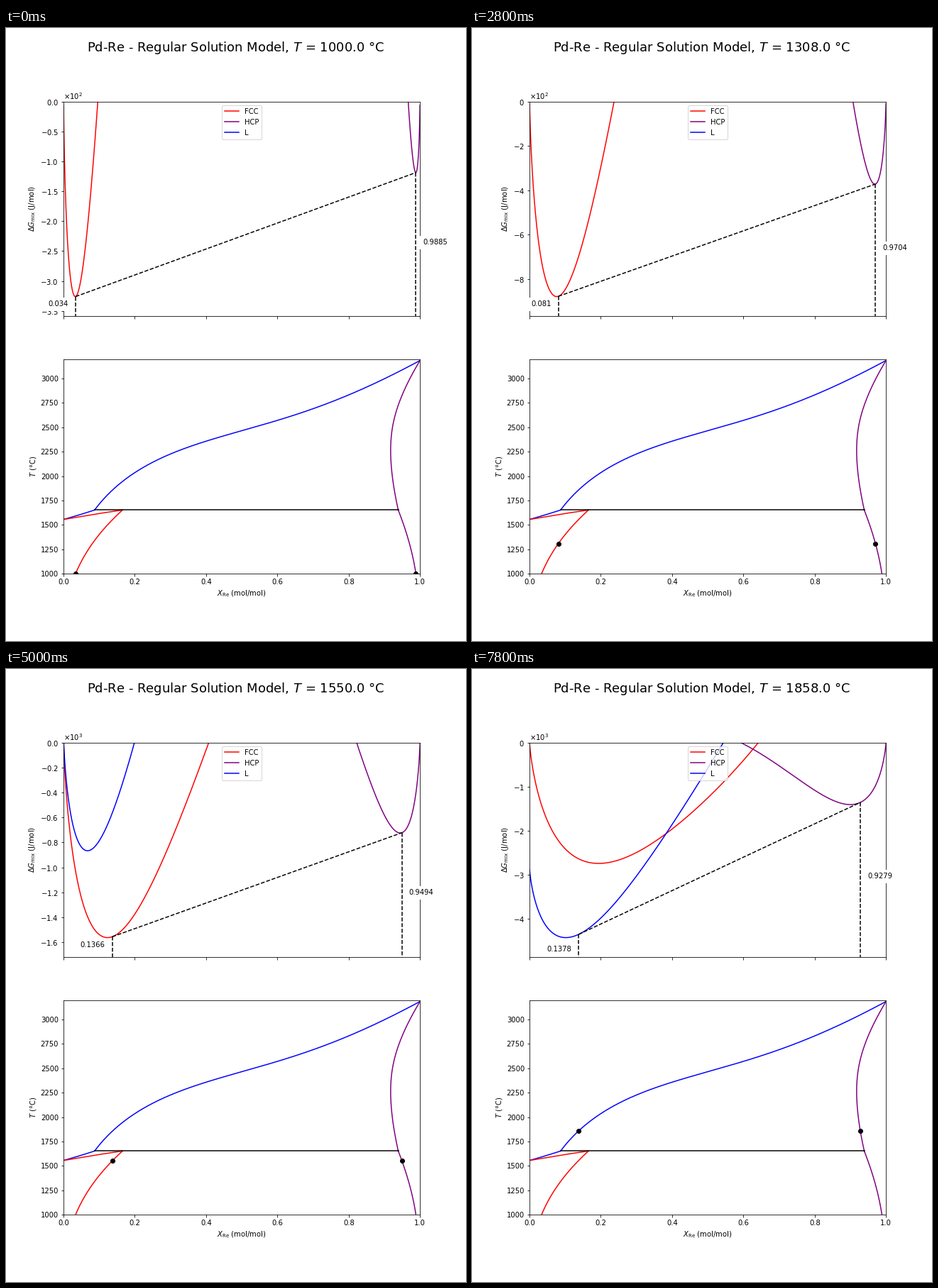
Write a matplotlib script that moves like this. It is 648 by 864 pixels and loops after 8000 ms.

```python
import numpy as np
import matplotlib.pyplot as plt
from matplotlib.animation import FuncAnimation

R = 8.314462618
K0 = 273.15
T_START, T_STEP, FRAMES = 1000, 22, 40
TM_PD, TM_RE = 1828.0, 3458.0
X = np.linspace(1e-4, 1 - 1e-4, 5000)


def poly(T, a, b, c, d=0, e=0, f=0):
    return a + b * T + c * T * np.log(T) + d * T**2 + e * T**3 + f / T


def melt_pd(T):
    """Liquid minus fcc energy of Pd, J/mol."""
    if T < TM_PD:
        return (poly(T, 23405.778, -116.918419, 10.8922, -27.266e-3, 2.430675e-6, -1853674)
                - poly(T, 917.062, 49.659892, -13.5708, -7.17522e-3, 1.91115e-7, -1112465))
    return (poly(T, -12373.637, 251.416903, -41.17)
            - poly(T, -67161.018, 370.102147, -54.2067, 2.091396e-3, -6.2811e-8, 18683526))


def melt_re(T):
    """Liquid minus hcp energy of Re, J/mol."""
    if T < 2000:
        return 23820.883 - 6.345379 * T
    liquid = poly(T, 568842.665, -2527.838455, 314.1788975, -89.39817e-3, 3.92854e-6, -163100987)
    if T < 2400:
        return liquid - poly(T, -15775.998, 194.667426, -33.586, 2.24565e-3, -2.81835e-7, 1376270)
    return liquid - poly(T, -70882.739, 462.110749, -67.956, 11.84945e-3, -7.88955e-7, 18075200)


# each phase: energy of pure Pd, energy of pure Re, interaction parameter
def fcc(T):
    return 0.0, 11000 - 1.5 * T, 28490.0


def hcp(T):
    return 2000 + 0.1 * T, 0.0, 45870.0


def liq(T):
    return melt_pd(T), melt_re(T), 31924.0


def gibbs(phase, T, x):
    pd, re, w = phase(T)
    mix = x * np.log(x) + (1 - x) * np.log(1 - x)
    return pd * (1 - x) + re * x + R * T * mix + w * x * (1 - x)


def potentials(phase, T, x):
    """Chemical potentials of Pd and Re and their slopes."""
    pd, re, w = phase(T)
    rt = R * T
    return (pd + rt * np.log(1 - x) + w * x**2,
            re + rt * np.log(x) + w * (1 - x)**2,
            -rt / (1 - x) + 2 * w * x,
            rt / x - 2 * w * (1 - x))


def tangent(p, q, T, x, y):
    """Common tangent of two phases by damped Newton steps."""
    for _ in range(60):
        p1, r1, dp1, dr1 = potentials(p, T, x)
        p2, r2, dp2, dr2 = potentials(q, T, y)
        fp, fr = p1 - p2, r1 - r2
        det = dp2 * dr1 - dp1 * dr2
        if det == 0:
            break
        dx = (fp * dr2 - fr * dp2) / det
        dy = (fp * dr1 - fr * dp1) / det
        x += min(max(dx, -x / 2), (1 - x) / 2)
        y += min(max(dy, -y / 2), (1 - y) / 2)
        if abs(dx) + abs(dy) < 1e-12:
            break
    return x, y


def trace(p, q, temps, x, y):
    rows = []
    for T in temps:
        x, y = tangent(p, q, T, x, y)
        rows.append((T, x, y))
    return np.array(rows).T


def liquid_gap(T):
    """How far the liquid stays above the fcc-hcp tangent."""
    x, y = tangent(fcc, hcp, T, 0.1, 0.95)
    g, h = gibbs(fcc, T, x), gibbs(hcp, T, y)
    return np.min(gibbs(liq, T, X) - g - (h - g) * (X - x) / (y - x))


lo, hi = 1860.0, 1980.0
for _ in range(30):
    mid = (lo + hi) / 2
    if liquid_gap(mid) > 0:
        lo = mid
    else:
        hi = mid
T_PER = (lo + hi) / 2

solid = trace(fcc, hcp, np.linspace(T_START + K0, T_PER, 250), 0.04, 0.985)
upper = trace(liq, hcp, np.linspace(T_PER, TM_RE - 0.5, 500), 0.088, 0.939)
lower = trace(liq, fcc, np.linspace(T_PER, TM_PD + 0.3, 150), 0.088, 0.165)
upper = np.column_stack([upper, (TM_RE, 1, 1)])
lower = np.column_stack([lower, (TM_PD, 0, 0)])[:, ::-1]

fig, (top, low) = plt.subplots(2, 1, sharex=True, figsize=(9, 12), dpi=72)
title = fig.suptitle("", fontsize=18)

PHASES = ((fcc, "red", "FCC"), (hcp, "purple", "HCP"), (liq, "blue", "L"))
curves = [top.plot([], [], color=c, label=name)[0] for _, c, name in PHASES]
top.set_ylabel(r"$\Delta G_{\mathrm{mix}}$ (J/mol)")
top.ticklabel_format(axis="y", style="sci", scilimits=(0, 0), useMathText=True)
top.legend(loc="upper center")

for (T, x, y), cx, cy in ((solid, "red", "purple"), (lower, "blue", "red"),
                          (upper, "blue", "purple")):
    low.plot(x, T - K0, color=cx)
    low.plot(y, T - K0, color=cy)
low.plot([upper[1, 0], upper[2, 0]], [T_PER - K0] * 2, color="black")
low.set_xlim(0, 1)
low.set_ylim(1000, 3200)
low.set_xlabel(r"$X_{\mathrm{Re}}$ (mol/mol)")
low.set_ylabel("$T$ (°C)")

marks = []


def drop(x, g, floor, side, va):
    """Dashed line down to the axis with its composition label."""
    marks.extend(top.plot([x, x], [g, floor], "k--"))
    marks.append(top.text(x + 0.02 * side, (g + floor) / 2, f"{round(x, 4)}",
                          ha="left" if side > 0 else "right", va=va,
                          bbox=dict(facecolor="white", edgecolor="white")))


def tie(p, q, path, T, floor, va=("baseline", "baseline")):
    x, y = (float(np.interp(T, path[0], row)) for row in path[1:])
    g, h = gibbs(p, T, x), gibbs(q, T, y)
    marks.extend(top.plot([x, y], [g, h], "k--"))
    drop(x, g, floor, -1, va[0])
    drop(y, h, floor, 1, va[1])
    marks.extend(low.plot([x, y], [T - K0] * 2, "ko"))


def update(i):
    celsius = float(T_START + T_STEP * i)
    T = celsius + K0
    for m in marks:
        m.remove()
    marks.clear()

    title.set_text(f"Pd-Re - Regular Solution Model, $T$ = {celsius} °C")
    values = [gibbs(phase, T, X) for phase, _, _ in PHASES]
    for line, g in zip(curves, values):
        line.set_data(X, g)
    floor = 1.1 * min(g.min() for g in values)
    top.set_ylim(floor, 0)

    if T < T_PER:
        if T > TM_PD:
            tie(liq, fcc, lower, T, floor, ("top", "bottom"))
        tie(fcc, hcp, solid, T, floor)
    else:
        tie(liq, hcp, upper, T, floor, ("top", "bottom"))
    return curves + marks + [title]


anim = FuncAnimation(fig, update, frames=FRAMES, interval=200, repeat=True,
                     repeat_delay=0, blit=False)
plt.show()
```
